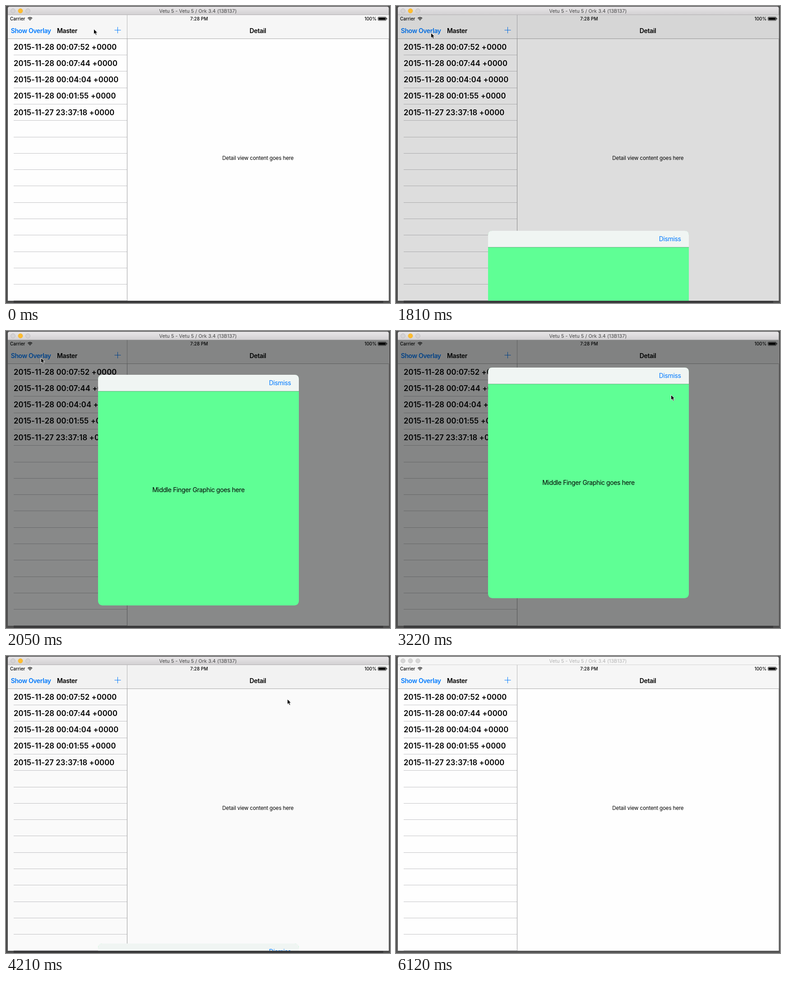
These frames come from a looping animation (851x658 px, 6.15 s). An HTML page:

```html
<!DOCTYPE html>
<html lang="en">
<head>
<meta charset="utf-8">
<title>Split view with overlay</title>
<style>
html, body { margin: 0; width: 100%; height: 100%; overflow: hidden; background: #565656; }
svg { display: block; width: 851px; height: 658px; }
text { font-family: Inter, Roboto, sans-serif; font-feature-settings: "calt" 0; white-space: pre; }
.title { font-size: 10.7px; letter-spacing: .1px; text-anchor: middle; }
.status { font-size: 9.9px; font-weight: 500; letter-spacing: .1px; }
.nav { font-size: 14px; font-weight: 600; letter-spacing: -.4px; }
.row { font-size: 16.7px; font-weight: 600; letter-spacing: .11px; }
.note { font-size: 11.55px; letter-spacing: -.13px; text-anchor: middle; }
.label { font-size: 14px; letter-spacing: -.38px; }
.mid { text-anchor: middle; }
.blue { fill: #007aff; }
</style>
</head>
<body>
<svg viewBox="0 0 851 658">
  <defs>
    <linearGradient id="barFill" x2="0" y2="1">
      <stop offset="0" stop-color="#e9e7e9"/>
      <stop offset="1" stop-color="#d1cfd1"/>
    </linearGradient>
    <clipPath id="screen"><rect x="4" y="20" width="844.400" height="633"/></clipPath>
  </defs>

  <rect width="851" height="658" fill="#565656"/>
  <g id="shadow">
    <rect width="851" height="658" fill="#4d4d4d"/>
    <rect x="17" y="653" width="819" height="5" fill="#3a3a3b"/>
  </g>

  <path id="bar" d="M4 20V5.500Q4 1.500 8 1.500H844.400Q848.400 1.500 848.400 5.500V20Z"/>
  <rect id="barLine" x="4" y="19" width="844.400" height="1"/>
  <g id="lights"></g>
  <text id="title" class="title" x="425.500" y="15">Vetu 5 - Vetu 5 / Ork 3.4 (13B137)</text>

  <g clip-path="url(#screen)">
    <rect x="4" y="20" width="845" height="633" fill="#fefefe"/>
    <rect x="4" y="20" width="845" height="52" fill="#f6f6f6"/>
    <rect x="4" y="72" width="845" height="1" fill="#acacac"/>

    <text class="status" x="9" y="32">Carrier</text>
    <g fill="none" stroke="#000" stroke-width="1.300">
      <path d="M48.300 27.300Q53.200 23 58.100 27.300M50 29.200Q53.200 26.400 56.400 29.200"/>
      <path d="M51.600 30.400Q53.200 29 54.800 30.400L53.200 32Z" fill="#000" stroke="none"/>
    </g>
    <text class="status mid" x="428" y="32" font-weight="600">7:28 PM</text>
    <text class="status" x="821.500" y="32" text-anchor="end">100%</text>
    <rect x="824.500" y="24.500" width="18" height="7.500" rx="1.500" fill="none" stroke="#000" stroke-width=".8"/>
    <rect x="825.700" y="25.700" width="15.600" height="5.100" rx=".6"/>
    <rect x="843.300" y="26.700" width="1.200" height="3" rx=".6"/>

    <text id="show" class="nav blue" x="10.700" y="59.500">Show Overlay</text>
    <text class="nav" x="113" y="59.500">Master</text>
    <path d="M240.500 53.500H254.500M247.500 46.500V60.500" stroke="#007aff"/>
    <text class="nav mid" x="558" y="59.500">Detail</text>

    <g id="rows"></g>
    <rect x="268" y="20" width="1" height="52" fill="#b8b8b9"/>
    <rect x="268" y="72" width="1" height="581" fill="#9d9d9f"/>
    <text class="note" x="558.400" y="340.700">Detail view content goes here</text>

    <rect id="dim" x="4" y="20" width="845" height="633" fill="#000304"/>
    <g id="card">
      <rect width="445" height="511" rx="9.500" fill="#5fff95"/>
      <path d="M0 36V9.500Q0 0 9.500 0H435.500Q445 0 445 9.500V36Z" fill="#f0f5f3"/>
      <rect y="36" width="445" height="1" fill="#6fb186"/>
      <text id="dismiss" class="label blue" x="378.800" y="23.200">Dismiss</text>
      <text class="label mid" x="222.500" y="260.300">Middle Finger Graphic goes here</text>
    </g>
  </g>

  <g id="cursor">
    <path d="M1 1.500V13L3.700 10.600L5.500 14.700L7.600 13.800L5.800 9.800H9.300Z" opacity=".2"/>
    <path d="M.5 .5V12L3.200 9.600L5 13.700L7.100 12.800L5.300 8.800H8.800Z" stroke="#fff" stroke-width=".9"/>
  </g>
</svg>

<script>
const LOOP = 6150;
const SHOW_AT = 1754.6, DISMISS_AT = 3916, INACTIVE_AT = 6120;
const CARD_X = 204, CARD_TOP = 81, CARD_OUT = 653;
const DIM = 0.48, STIFFNESS = 0.0184;

const $ = id => document.getElementById(id);

function add(parent, tag, attrs, text) {
  const el = document.createElementNS("http://www.w3.org/2000/svg", tag);
  for (const key in attrs) el.setAttribute(key, attrs[key]);
  if (text) el.textContent = text;
  parent.appendChild(el);
  return el;
}

const lights = [15.5, 32, 48.5].map(x => add($("lights"), "circle", { cx: x, cy: 10.8, r: 4.9 }));

const dates = ["28 00:07:52", "28 00:07:44", "28 00:04:04", "28 00:01:55", "27 23:37:18"];
const ROW = 36.28;
dates.forEach((d, i) =>
  add($("rows"), "text", { class: "row", x: 17, y: 96.5 + i * ROW }, `2015-11-${d} +0000`));
for (let i = 0; i < 16; i++)
  add($("rows"), "rect", { x: 17, y: Math.round(108.2 + i * ROW), width: 251, height: 1, fill: "#c4c4c7" });

// Pointer stops: time, x, y; each holds until the next.
const pointer = [
  [0, 194, 50.5],
  [450, 186, 51], [540, 160, 53], [630, 125, 56], [720, 98, 58], [810, 83, 59], [920, 77, 59],
  [2860, 130, 90], [2950, 320, 155], [3040, 490, 179], [3130, 582, 166], [3220, 609, 141],
  [3310, 613, 122], [3400, 615, 109], [3490, 619, 101], [3580, 623, 95]
];
const showFade = [[0, 1], [1540, .25], [1630, .45], [1720, .8], [1810, 1]];
const dismissFade = [[0, 1], [3940, .3], [4030, .52], [4210, 1]];
const pointerFade = [[0, 1], [4860, .45], [4980, 0]];
const cardTicks = [0, 1810, 1900, 2050, 2200, 2350, 3940, 4030, 4210, 4390, 4530].map(t => [t]);

const held = (steps, t) => steps.filter(s => s[0] <= t).pop();

// Critically damped spring: the share of the way still to go.
function remaining(ms) {
  const k = Math.max(0, ms) * STIFFNESS;
  return (1 + k) * Math.exp(-k);
}

function presence(t) {
  if (t < SHOW_AT || t >= 4530) return 0;
  return t < DISMISS_AT ? 1 - remaining(t - SHOW_AT) : remaining(t - DISMISS_AT);
}

function paint(el, fill, stroke) {
  el.setAttribute("fill", fill);
  if (stroke) el.setAttribute("stroke", stroke);
}

function drawChrome(active) {
  $("shadow").setAttribute("opacity", active ? 1 : 0);
  paint($("bar"), active ? "url(#barFill)" : "#f6f6f6");
  paint($("barLine"), active ? "#b3b1b3" : "#d3d3d3");
  paint($("title"), active ? "#434343" : "#b3b3b3");
  lights.forEach((light, i) => {
    if (!active) paint(light, "#d6d6d6", "#cbcbcb");
    else if (i === 1) paint(light, "#ffbd2e", "#f0b132");
    else paint(light, "#d5d3d5", "#bebcbe");
  });
}

function draw(t) {
  drawChrome(t < INACTIVE_AT);

  const p = presence(held(cardTicks, t)[0]);
  const y = Math.round(CARD_OUT + (CARD_TOP - CARD_OUT) * p);
  $("card").setAttribute("transform", `translate(${CARD_X} ${y})`);
  $("card").setAttribute("visibility", p > 0 ? "visible" : "hidden");
  $("dim").setAttribute("opacity", DIM * p);

  $("show").setAttribute("opacity", held(showFade, t)[1]);
  $("dismiss").setAttribute("opacity", held(dismissFade, t)[1]);

  const [, px, py] = held(pointer, t);
  $("cursor").setAttribute("transform", `translate(${px} ${py})`);
  $("cursor").setAttribute("opacity", held(pointerFade, t)[1]);
}

const start = performance.now();
function tick() {
  draw((performance.now() - start) % LOOP);
  requestAnimationFrame(tick);
}
tick();
</script>
</body>
</html>
```
